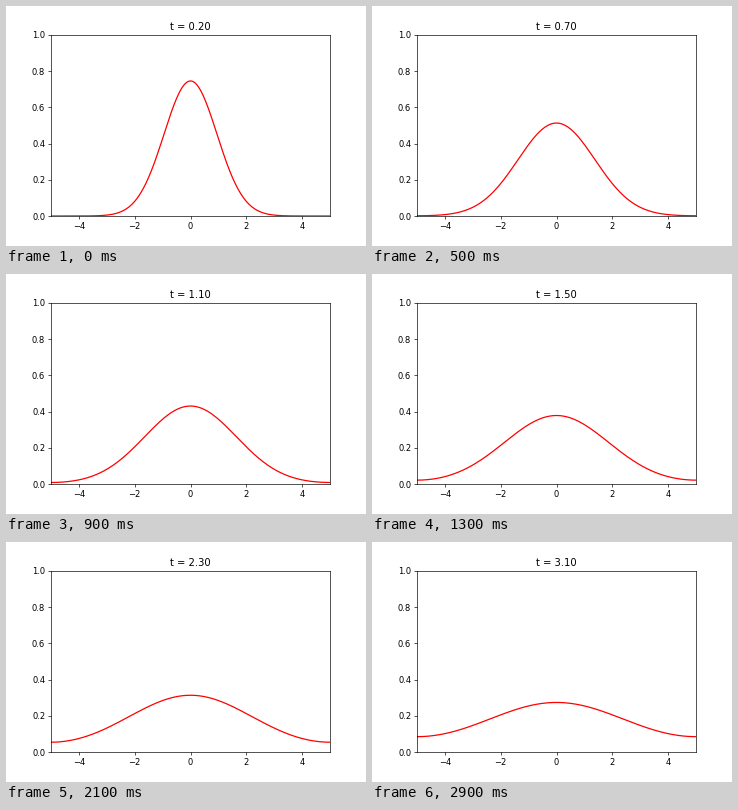
Recreate the animation shown at these times as a matplotlib script. Size 360 by 240 pixels, loop 3 s.

```python
import numpy as np
import matplotlib.pyplot as plt
from matplotlib.animation import FuncAnimation

FRAMES = 30
INTERVAL = 100  # ms
PERIOD = 10

x = np.linspace(-5, 5, 201)


def heat(x, t):
    """Periodic heat equation solution starting from exp(-x^2)."""
    spread = 1 + 4 * t
    images = (np.exp(-(x - k * PERIOD) ** 2 / spread) for k in range(-3, 4))
    return sum(images) / np.sqrt(spread)


fig, ax = plt.subplots(figsize=(6, 4), dpi=60)
fig.subplots_adjust(left=0.125, right=0.9, bottom=0.125, top=0.88)
ax.set_xlim(-5, 5)
ax.set_ylim(0, 1)
ax.set_xticks(range(-4, 5, 2))
line, = ax.plot([], [], color="red", lw=1.5)
title = ax.set_title("")


def update(i):
    t = 0.2 + 0.1 * i
    line.set_data(x, heat(x, t))
    title.set_text(f"t = {t:.2f}")
    return line, title


anim = FuncAnimation(fig, update, frames=FRAMES, interval=INTERVAL,
                     repeat=True, repeat_delay=0, blit=False)
plt.show()
```
